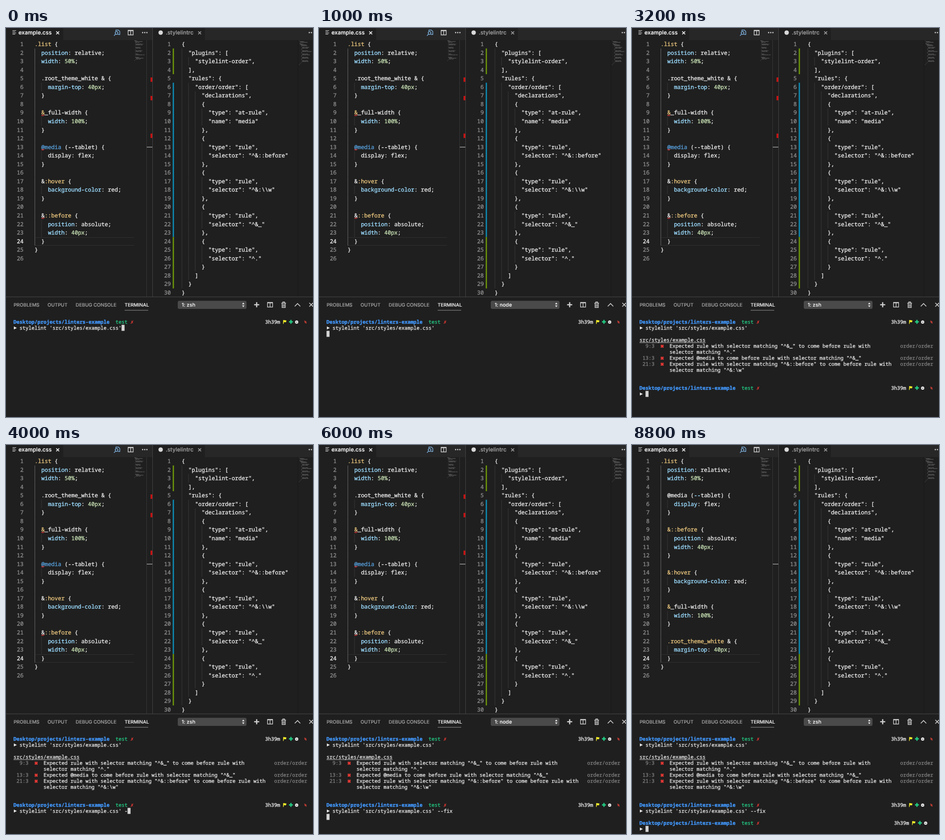
Recreate the animation shown at these times as an HTML page. Size 665 by 842 pixels, loop 10000 ms.

```html
<!DOCTYPE html>
<html lang="en">
<head>
<meta charset="utf-8">
<style>
  html, body { margin: 0; width: 100%; height: 100%; overflow: hidden; background: #1f1f1f; }
  svg { display: block; width: 665px; height: 842px; }
  text { white-space: pre; color: #e6e6e6; text-rendering: geometricPrecision; font-variant-ligatures: none; }
  text, tspan { fill: currentColor; stroke: currentColor; }
  .code { font: 500 12.04px "Noto Sans Mono", "DejaVu Sans Mono", monospace; stroke-width: .4; }
  .term { font: 500 10.83px "Noto Sans Mono", "DejaVu Sans Mono", monospace; stroke-width: .35; }
  .ui { font: 500 12px Inter, sans-serif; stroke-width: .2; }
  .line { fill: none; stroke: #d0d0d0; stroke-width: 1.4; }
</style>
</head>
<body>
<svg id="stage" viewBox="0 0 665 842"></svg>
<script>
const before = `~y.list~ {
  ~bposition~: relative;
  ~bwidth~: ~n50%~;

  .root_theme_white & {
    ~bmargin-top~: ~n40px~;
  }

  ~y&~_full-width {
    ~bwidth~: ~n100%~;
  }

  ~k@media~ (--tablet) {
    display: flex;
  }

  &~y:hover~ {
    ~bbackground-color~: red;
  }

  &~y::before~ {
    ~bposition~: absolute;
    ~bwidth~: ~n40px~;
  }
}
`.split("\n");

const after = `~y.list~ {
  ~bposition~: relative;
  ~bwidth~: ~n50%~;

  @media (~b--~tablet) {
    ~bdisplay~: flex;
  }

  ~y&::before~ {
    ~bposition~: absolute;
    ~bwidth~: ~n40px~;
  }

  ~y&:hover~ {
    ~bbackground-color~: red;
  }

  ~y&~_full-width {
    ~bwidth~: ~n100%~;
  }

  ~y.root_theme_white~ & {
    ~bmargin-top~: ~n40px~;
  }
}
`.split("\n");

const rule = selector => `      {
        "type": "rule",
        "selector": "${selector}"
      }`;
const config = `{
  "plugins": [
    "stylelint-order",
  ],
  "rules": {
    "order/order": [
      "declarations",
      {
        "type": "at-rule",
        "name": "media"
      },
${["^&::before", "^&:\\\\w", "^&_", "^."].map(rule).join(",\n")}
    ]
  }
}`.split("\n");

const colors = { y: "#e6c37c", b: "#9cdcfe", n: "#c3dcb0", k: "#569cd6" };
const CHAR = 7.22, ROW = 18.55, COL = 6.5;
const rowY = n => 35 + (n - 1) * ROW;
const termX = col => 16.3 + col * COL;
const termY = row => 636 + row * 13;

const escape = s => s.replace(/&/g, "&amp;").replace(/</g, "&lt;");
const rect = (x, y, w, h, fill, extra = "") =>
  `<rect x="${x}" y="${y}" width="${w}" height="${h}" fill="${fill}" ${extra}/>`;
const path = (d, extra = "") => `<path class="line" d="${d}" ${extra}/>`;
const shape = (d, fill) => `<path d="${d}" fill="${fill}"/>`;
const label = (cls, x, y, s, color = "#e6e6e6", extra = "") =>
  `<text class="${cls}" x="${x}" y="${y}" style="color:${color};${extra}">${escape(s)}</text>`;
const during = (steps, content) => `<g data-steps="${steps}">${content}</g>`;
const cross = (x, y, r, color) =>
  path(`M${x - r} ${y - r}l${2 * r} ${2 * r}m0 ${-2 * r}l${-2 * r} ${2 * r}`, `style="stroke:${color};stroke-width:1.7"`);

// Text, indent guides and minimap of one editor
function editor(lines, x, mapX, firstGuide) {
  let out = "", indent = 0;
  const indents = [];
  for (let i = lines.length - 1; i >= 0; i--) {
    if (lines[i]) indent = lines[i].search(/\S/);
    indents[i] = indent;
  }
  lines.forEach((line, i) => {
    const y = rowY(i + 1);
    for (let c = 0; c < indents[i]; c += 2)
      out += rect(x + c * CHAR, y - ROW / 2, 1, ROW + .1, c ? "#3a3a3a" : firstGuide);
    const spans = line.split("~").map((part, k) => k % 2
      ? `<tspan style="color:${colors[part[0]]}">${escape(part.slice(1))}</tspan>` : escape(part));
    out += `<text class="code" x="${x}" y="${y + 4}">${spans.join("")}</text>`;
    for (const word of line.replace(/~[ybnk]?/g, "").matchAll(/\S+/g))
      out += rect(mapX + word.index * .85, 27 + i * 1.8, word[0].length * .85, 1, "#8c8c8c", 'opacity=".65"');
  });
  return out;
}

function lineNumbers(count, right, active) {
  let out = "";
  for (let n = 1; n <= count; n++)
    out += label("code", right, rowY(n) + 4, String(n), n === active ? "#eee" : "#8c8c8c", "text-anchor:end");
  return out;
}

const squiggle = row =>
  path(`M77 ${rowY(row) + 7}q1 -3 2 -1.2t2 0t2 0`, 'style="stroke:#e03c3c;stroke-width:1.2"');
const splitIcon = (x, y) => path(`M${x - 5.5} ${y - 5}h11v10h-11zM${x} ${y - 5}v10M${x - 5.5} ${y - 4}h11`);
const dots = (x, n) => [...Array(n).keys()]
  .map(i => `<circle cx="${x + i * 4.6}" cy="10" r="1.4" fill="#d0d0d0"/>`).join("");

function tabs() {
  const blue = 'style="stroke:#7fb4e0"';
  return rect(0, 0, 665, 26, "#272728") + rect(0, 0, 124, 26, "#1f1f1f") + rect(318, 0, 113, 26, "#1f1f1f")
    + path("M14 5.5h8M14 8h6M14 10.7h8M14 13.4h6", 'style="stroke-width:1.1"')
    + label("ui", 27, 14, "example.css", "#fff") + cross(112, 10.5, 3.2, "#eee")
    + path("M238 7V4.5h5.5l3 3V14h-4", blue)
    + `<circle class="line" cx="239.5" cy="10.8" r="3" ${blue}/>` + path("M237.3 13.2l-3.3 3.5", blue)
    + splitIcon(270, 10) + dots(296, 3)
    + `<circle cx="335" cy="10" r="4.8" fill="#d8d8d8"/>`
    + label("ui", 346, 14, ".stylelintrc", "#a4a4a4") + cross(419.5, 10.5, 3.2, "#999") + dots(657, 2);
}

function panelHeader() {
  const titles = [[16.5, "PROBLEMS"], [90, "OUTPUT"], [151, "DEBUG CONSOLE"], [257, "TERMINAL"]];
  return rect(0, 581.5, 665, 1, "#4a4a4a")
    + titles.map(([x, s]) => label("ui", x, 603, s, x > 250 ? "#f2f2f2" : "#a0a0a0", "font-size:10.3px")).join("")
    + rect(257, 610.5, 51, 1, "#999")
    + rect(372, 590.5, 149, 17.5, "#4a4a4a", 'rx="3.5"')
    + during("02346", label("ui", 380.5, 603, "1: zsh", "#f2f2f2", "font-size:11px"))
    + during("15", label("ui", 380.5, 603, "1: node", "#f2f2f2", "font-size:11px"))
    + shape("M511.3 598l2.7-3.7 2.7 3.7zM511.3 600.5l2.7 3.7 2.7-3.7z", "#e8e8e8")
    + path("M537.5 599h11M543 593.5v11", 'style="stroke-width:2.6"') + splitIcon(572, 599)
    + path("M596.5 595.5h10M599.5 595v-2h4v2M598 596v9h7v-9M600.3 597.5v6M602.7 597.5v6")
    + path("M625.5 602.5l6-6 6 6", 'style="stroke-width:1.6"') + cross(661, 599, 4, "#d0d0d0");
}

function prompt(row, clean) {
  const y = termY(row), dx = clean ? COL : 0;
  return label("term", termX(0), y + 4, "Desktop/projects/linters-example", "#4299ff", "font-weight:700")
    + label("term", termX(34), y + 4, "test", "#23c983")
    + label("term", termX(39), y + 4, "✗", "#e53935", "font-weight:700")
    + shape(`M17 ${y + 10}l6.5 3.2-6.5 3.2z`, "#e6e6e6")
    + label("term", 561.2 + dx, y + 4, "3h39m", "#f2f2f2")
    + `<g transform="translate(${dx} ${y})">`
    + shape("M600.5-4l7 1-1 4-4.5-.5-.7 4h-1.2z", "#f4ee2a")
    + path("M613 0h8.4M617.2-4.2v8.4", 'style="stroke:#22c982;stroke-width:2.8"')
    + `<circle cx="629.6" cy=".5" r="3.5" fill="#eee"/>` + rect(628, 0, 3.2, 1.2, "#444")
    + (clean ? "" : shape("M646-3l4.5 2 .7 5-4.2-2z", "#b43a32")) + "</g>";
}

function report() {
  const dim = "#7f7f7f";
  const issues = [
    [4, " 9:3", 'Expected rule with selector matching "^&_" to come before rule with', 'selector matching "^."'],
    [6, "13:3", 'Expected @media to come before rule with selector matching "^&_"', ""],
    [7, "21:3", 'Expected rule with selector matching "^&::before" to come before rule with', 'selector matching "^&:\\w"'],
  ];
  return label("term", termX(0), termY(3) + 4, "src/styles/example.css") + rect(16.3, 680.5, 143, 1, "#d0d0d0")
    + issues.map(([row, at, first, second]) => {
      const y = termY(row) + 4;
      return label("term", termX(1), y, at, dim)
        + label("term", termX(7), y + .5, "✖", "#e53935", "font-size:12.5px;stroke-width:.8")
        + label("term", termX(10), y, first) + label("term", termX(10), y + 13, second)
        + label("term", termX(87) - .8, y, "order/order", dim);
    }).join("");
}

const command = (row, suffix = "") =>
  label("term", termX(2), termY(row) + 4, "stylelint 'src/styles/example.css'" + suffix);
const cursors = [[36, 1], [0, 2], [2, 12], [38, 12], [42, 12], [0, 13], [2, 15]];

const stage = document.getElementById("stage");
stage.innerHTML = rect(0, 0, 665, 842, "#1f1f1f") + tabs()
  + rect(62, 453, 215, 1, "#303030") + rect(62, 470, 215, 1, "#303030")
  + lineNumbers(26, 38, 24) + lineNumbers(30, 357)
  + during("012345", editor(before, 62, 278, "#686868") + [9, 13, 21].map(squiggle).join("")
    + [107, 147, 228.5].map(y => rect(313, y, 4, 9.5, "#c41414")).join(""))
  + during("6", editor(after, 62, 278, "#686868"))
  + editor(config, 380.5, 634.5, "#3a3a3a")
  + rect(304, 26, 1, 556, "#383838") + rect(317, 0, 1, 582, "#444") + rect(632, 26, 1, 556, "#181818")
  + rect(305, 257, 12, 1.5, "#a0a0a0")
  + [[2, 5, "#648a0c"], [6, 24, "#0f80a5"], [24, 30, "#648a0c"]].map(([from, to, fill]) =>
    rect(361, rowY(from) - ROW / 2, 3, (to - from) * ROW, fill)).join("")
  + panelHeader() + prompt(0) + command(1)
  + during("23456", report() + prompt(11))
  + during("3", command(12, " -")) + during("456", command(12, " --fix"))
  + during("6", prompt(14, true))
  + cursors.map(([col, row], step) =>
    during(step, rect(termX(col), termY(row) - 6.5, COL, 13, "#d4d4d4"))).join("");

const changes = [1000, 2000, 4000, 5000, 6000, 7000];
const timed = stage.querySelectorAll("[data-steps]");
function draw() {
  const time = performance.now() % 10000;
  const step = changes.filter(start => time >= start).length;
  for (const group of timed)
    group.style.display = group.dataset.steps.includes(step) ? "" : "none";
  requestAnimationFrame(draw);
}
draw();
</script>
</body>
</html>
```
